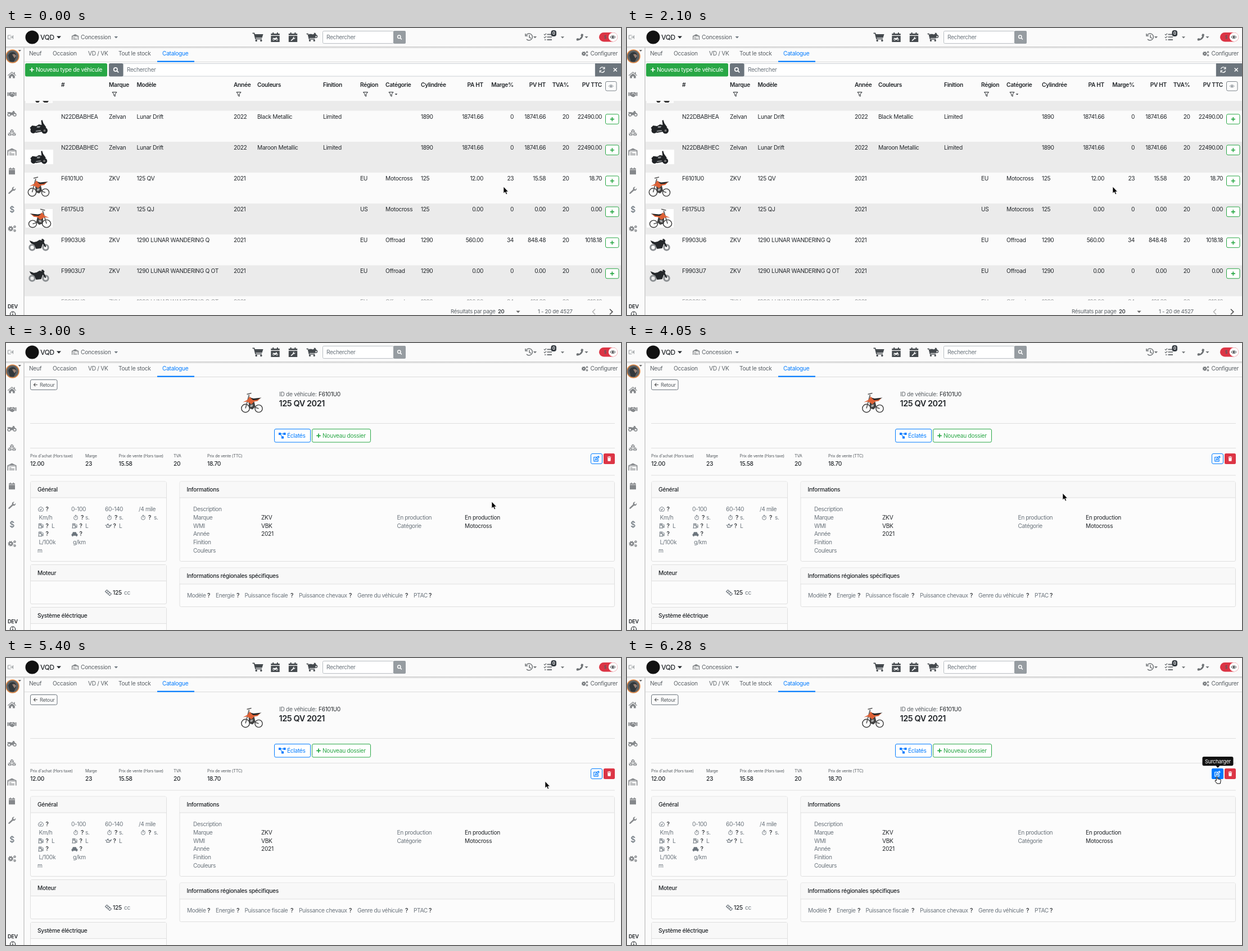
Animation of 1094 by 512 pixels, one loop 8000 ms. Source, as an HTML page:

```html
<!DOCTYPE html>
<html lang="fr">
<head>
<meta charset="utf-8">
<title>Catalogue</title>
<style>
html, body { margin: 0; width: 100%; height: 100%; overflow: hidden; background: #fbfbfb; }
svg { display: block; width: 100vw; height: 100vh; }
text { font: 10.2px Inter, Roboto, "Liberation Sans", sans-serif; letter-spacing: -.03em; fill: #212529; white-space: pre; }
.num { letter-spacing: -.045em; }
.b { font-weight: 600; }
.m { font-weight: 500; }
.brand { font-size: 12px; font-weight: 500; }
.title { font-size: 14.5px; font-weight: 600; }
.small { font-size: 9.1px; }
.foot { font-size: 9.6px; }
.tiny { font-size: 7.25px; fill: #555b60; }
.tip { font-size: 9.3px; }
.g { fill: #6c757d; letter-spacing: -.04em; }
.n { fill: #595f64; }
.w { fill: #fff; }
.blue { fill: #007bff; }
.green { fill: #28a745; }
.e { text-anchor: end; }
.c { text-anchor: middle; }
.l { fill: none; stroke: currentColor; }
use { fill: currentColor; }
#list, #load, #page, #arrow, #hand, #over { animation: 8s step-end infinite; }
#list { animation-name: list; }
#load { animation-name: load; }
#page { animation-name: page; }
#arrow { animation-name: arrow; }
#hand { animation-name: hand; }
#over { animation-name: over; }
@keyframes list { 0% { opacity: 1 } 35.625%, 100% { opacity: 0 } }
@keyframes load { 0% { opacity: 0 } 35.625% { opacity: 1 } 37.5%, 100% { opacity: 0 } }
@keyframes page { 0% { opacity: 0 } 37.5%, 100% { opacity: 1 } }
@keyframes hand { 0% { opacity: 0 } 76.75%, 100% { opacity: 1 } }
@keyframes over { 0% { opacity: 0 } 76.75% { opacity: .5 } 78.5%, 100% { opacity: 1 } }
@keyframes arrow {
  0% { transform: translate(885px, 283px) }
  7.5% { transform: translate(885px, 284px) }
  24.375% { transform: translate(877px, 283px) }
  26.25% { transform: translate(864px, 283px) }
  48.75% { transform: translate(811px, 282px) }
  50.625% { transform: translate(775px, 268px) }
  61.875% { transform: translate(878px, 244px) }
  63.75% { transform: translate(924px, 242px) }
  67.5% { transform: translate(959px, 220px) }
  69.375% { transform: translate(994px, 218px) }
  71.25% { transform: translate(999px, 216px) }
  73.125% { transform: translate(1030px, 210px) }
  74.875% { transform: translate(1038px, 210px) }
  76.75%, 100% { transform: translate(-40px, 0) }
}
</style>
</head>
<body>
<svg id="stage" viewBox="0 0 1094 512" preserveAspectRatio="none" xmlns="http://www.w3.org/2000/svg">
<defs>
  <linearGradient id="shade" x2="0" y2="1"><stop stop-color="#c9c9c9"/><stop offset="1" stop-color="#fbfbfb"/></linearGradient>
  <clipPath id="table"><path d="M33 130H1094V485.5H33Z"/></clipPath>
  <path id="caret" d="M-3.6-1.8H3.6L0 2Z"/>
  <path id="plus" d="M-4-.9H-.9V-4H.9V-.9H4V.9H.9V4H-.9V.9H-4Z"/>
  <path id="funnel" class="l" d="M-4-3.6H4L1.1 0V4L-1.1 2.6V0Z"/>
  <g id="find" class="l" stroke-width="1.6"><circle cx="-.8" cy="-.8" r="3"/><path d="M1.5 1.5 4.3 4.3"/></g>
  <g id="eye"><path class="l" d="M-5 0Q0-5.5 5 0Q0 5.5-5 0Z"/><circle r="1.6"/></g>
  <g id="gear"><circle class="l" r="2.6" stroke-width="2.6"/><circle class="l" r="4.2" stroke-width="1.5" stroke-dasharray="1.6 1.7"/></g>
  <g id="cogs"><use href="#gear" x="-2.2"/><use href="#gear" transform="translate(5 -3.5) scale(.5)"/><use href="#gear" transform="translate(5 3.5) scale(.5)"/></g>
  <path id="house" d="M-7.6 .3 0-6 3.6-3V-5.2H5.2V-1.6L7.6 .3 6.8 1.2 0-4.4-6.8 1.2ZM-5.2 1.3 0-3 5.2 1.3V5.6H1.5V2.2H-1.5V5.6H-5.2Z"/>
  <g id="shake"><path d="M-8-3.5H-6V3H-8ZM6-3.5H8V3H6ZM-5.3-2.8-2-4 0-3.2 2.5-4 5.3-2.8V2.2L1.5 5-1 4.6-5.3 2Z"/><path d="M-2.2-.3 1-2.2 4.3 1.2" fill="none" stroke="#fbfbfb"/></g>
  <g id="moto"><circle class="l" cx="-5" cy="2.2" r="2.4" stroke-width="1.5"/><circle class="l" cx="5" cy="2.2" r="2.4" stroke-width="1.5"/><path d="M-8-2.5H-3L-1-1.5 2-3 1-4.5H4L6.5 1 5.5 1.5 3.5-1 1.5 3H-2.5L-4-.5-8-1Z"/></g>
  <g id="boxes"><path id="cube" d="M0-6 3.2-4.6V-1.2L0 .2-3.2-1.2V-4.6Z"/><use href="#cube" x="-3.7" y="5.6"/><use href="#cube" x="3.7" y="5.6"/><path d="M-3-4.4 0-3 3-4.4M0-3V0M-6.7 1.2-3.7 2.6-.7 1.2M-3.7 2.6V5.5M.7 1.2 3.7 2.6 6.7 1.2M3.7 2.6V5.5" fill="none" stroke="#fbfbfb"/></g>
  <path id="depot" fill-rule="evenodd" d="M-8 6.5V-2.8L0-6.5 8-2.8V6.5H6.5V-1H-6.5V6.5ZM-6.2-2.8V-2H6.2V-2.8ZM-4.8 1H-.8V2H-4.8ZM-4.8 3H4.5V4H-4.8ZM-4.8 5H4.5V6H-4.8Z"/>
  <path id="cal" d="M-5.5-4.8H-3.5V-6.3H-2V-4.8H2V-6.3H3.5V-4.8H5.5V-2.8H-5.5ZM-5.5-2H5.5V6H-5.5Z"/>
  <path id="wrench" d="M-6 4.4.4-1.8C-.4-4.6 1.7-6.5 4.5-6L2.3-3.7 3-2 4.6-1.5 6.6-3.7C7.4-.8 4.8 1.5 2 .6L-4.3 6.2C-5.9 6.8-7 5.5-6 4.4Z"/>
  <g id="cart"><path class="l" d="M-9.5-7.2H-6.5L-4 3H7" stroke-width="1.7"/><path d="M-6-5.5H9.5L7.5 1H-4.3Z"/><circle cx="-2.8" cy="6" r="1.8"/><circle cx="5.8" cy="6" r="1.8"/></g>
  <path id="phone" d="M3.2-6 6.3-5.2C6.5 1.5 1.5 6.5-5.4 6.2L-6 3-3 1.6-1.2 3C.7 2 2-.1 2.8-1.6L1.6-3Z"/>
  <g id="edit" class="l" stroke-width="1.2"><path d="M1.2-3.2H-4.2V4.2H3.2V.4"/><path d="M-1.5 1.8-1-.6 3.6-4.8 5-3.2.6 1.2Z"/></g>
  <path id="trash" d="M-3.7-4.2H-1.5L-1-5H1L1.5-4.2H3.7V-3H-3.7ZM-3.2-2.4H3.2L2.7 4.5H-2.7Z"/>
  <g id="watch" class="l"><circle cy=".8" r="3.8"/><path d="M-1.4-4.4H1.4M0-4.4V-3M0-1.3V1M3-3.2 4-2.3"/></g>
  <g id="gauge" class="l"><path d="M-3.8 3.7A5 5 0 1 1 3.8 3.7Z"/><path d="M-1.4 2 1.8-1.2M-3-.3H-2" stroke-width="1.3"/></g>
  <g id="pump"><path class="l" d="M-4 4.4V-4.3H1V4.4M-5.2 4.4H2.2M1 0H2.7V3.4H4.6V-1.5L2.8-3.6" stroke-width="1.1"/><path d="M-2.7-3H-.2V-.4H-2.7Z"/></g>
  <path id="oil" class="l" stroke-width="1.2" d="M-6-1.5-3.5 0V2.8H2.2L6-1.8 2-.3-.5-1.8H-3.5M-2.5-3.4H1M-.8-3.4V-2"/>
  <path id="car" d="M-6 .3-4.5-.6-3.4-4H2.8L4.2-.6 6 .3V3.4H5V4.8H2.8V3.4H-2.8V4.8H-5V3.4H-6Z"/>
  <g id="cruiser"><circle cx="-10" cy="7" r="5"/><circle cx="10" cy="7" r="5.5"/><path d="M-16 2-12-2-5-1 0-4 5-3 4-11 6-12 8-6 13 1 9 5 5 9-5 11-13 7Z"/><path d="M-3-1 3-1 1 2-4 2ZM-5 7 4 6 3 8-6 9Z" fill="#8d9194"/><circle cx="10" cy="7" r="2" fill="#777"/></g>
  <g id="dirt">
    <g fill="none" stroke="#3b3b3b" stroke-width="1.4"><circle cx="-11.5" cy="10" r="7.2"/><circle cx="12" cy="10.5" r="6.6"/></g>
    <path d="M-6-1 4-2 6 7 1 12-5 10Z" fill="#3f3f3f"/>
    <path d="M-5-14-11.5 10M-9-15-1-17M5 8 12 10.5" fill="none" stroke="#555" stroke-width="1.6"/>
    <path d="M-16-1-8-5-4-11 0-7 4-6 15-8 10-3 4-2-1 3-5 0-9-2Z" fill="#dd6136"/>
    <path d="M-3-9 3-7.5 17-9 9-5 2-4.5Z" fill="#262626"/>
    <path d="M-3 4 2 3 1 7-3 8Z" fill="#aaa"/>
  </g>
  <g id="stock"><g fill="none" stroke="#8b8f92" stroke-width="3"><circle cx="-12" cy="4.5" r="4.7"/><circle cx="12" cy="4.5" r="4.7"/></g><path d="M-17-8-9-5-4-6 1-9 6-8 4-10 7-11 10-8 9-5 13 3 11 4 7-2 4 6-5 7-8 0-14-3Z" fill="#25282b"/></g>
</defs>
</svg>
<script>
const out = [];
const add = s => out.push(s);
const t = (x, y, s, cls = '') => add(`<text x="${x}" y="${y}" class="${cls}">${s}</text>`);
const icon = (id, x, y, color = '#6f7376', s = 1) =>
  add(`<use href="#${id}" transform="translate(${x} ${y}) scale(${s})" style="color:${color}"/>`);
const box = (x, y, w, h, fill, stroke = 'none', r = 0) =>
  add(`<rect x="${x}" y="${y}" width="${w}" height="${h}" rx="${r}" fill="${fill}" stroke="${stroke}"/>`);
const path = (d, stroke, w = 1, fill = 'none') =>
  add(`<path d="${d}" fill="${fill}" stroke="${stroke}" stroke-width="${w}"/>`);
const dot = (x, y, r, fill, stroke = 'none', w = 1) =>
  add(`<circle cx="${x}" cy="${y}" r="${r}" fill="${fill}" stroke="${stroke}" stroke-width="${w}"/>`);
const group = (attrs, draw) => { add(`<g ${attrs}>`); draw(); add('</g>'); };

const DARK = '#454a4e', BLUE = '#007bff', GREEN = '#28a745', RED = '#dc3545', LINE = '#dfdfdf';

function topBar() {
  box(0, 0, 1094, 33, '#fafafa');
  box(0, 33, 1094, 4, 'url(#shade)');
  path('M8.5 13H3.5V19.5H8.5M7 16.2H11M9.5 14 12 16.2 9.5 18.5M12.5 13V19.5', '#8b8f92', .9);
  dot(46.5, 16.5, 12, '#111');
  t(61, 20.7, 'VQD', 'brand');
  icon('caret', 94, 16.5, '#212529', 1.1);
  icon('depot', 123, 16.2, '#6f7376', .75);
  t(133, 20, 'Concession', 'n');
  icon('caret', 195.8, 16.7, '#6c757d', .9);
  icon('cart', 448, 16.5, DARK);
  for (const x of [479, 510.5]) icon('cal', x, 16.7, DARK, 1.4);
  icon('moto', 479, 19.2, '#fff', .6);
  icon('wrench', 510.5, 19.2, '#fff', .6);
  icon('cart', 543, 17, DARK, .9);
  icon('moto', 546.5, 13, DARK, .95);
  box(563.5, 5.5, 126, 22, '#fff', '#b9bec3', 2);
  t(570, 20, 'Rechercher', 'g');
  box(689, 5, 22, 23, '#969ca1', 'none', 2);
  icon('find', 700, 16.5, '#fff', .9);
  path('M925.5 12.5A6 6 0 1 1 926 20M924 10V14H928M931 12.5V16.7L934 18.3', '#6f7376', 1.5);
  icon('caret', 941, 16.5, '#6f7376', .85);
  path('M962.5 11.5H971M962.5 16.2H971M962.5 21H971', '#6f7376', 1.8);
  path('M957 11 958.4 12.6 961 9.8M957 16 958.4 17.6 961 14.8M958 21H960.5', '#6f7376', 1.3);
  box(969.5, 4, 9.5, 11, '#343a40', 'none', 4);
  t(974.2, 12.2, '0', 'tiny b w c');
  icon('caret', 990, 16.7, '#6f7376', .85);
  icon('phone', 1020.5, 16.3);
  icon('caret', 1032.5, 16.5, '#6f7376', .85);
  box(1055, 8, 33, 16.5, RED, 'none', 8.2);
  t(1066, 19, '$', 'tiny b c');
  dot(1079.8, 16.2, 8, '#fff');
  icon('eye', 1079.5, 16.2, '#212529', .9);
}

function sideBar() {
  path('M32 35V512', '#c4c4c4', 1.4);
  dot(11.5, 50.5, 11.5, '#5e6264', '#e58a45', 1.5);
  path('M4 49Q7 42 13 43T18 52L14 60H7Z', 'none', 0, '#33383b');
  path('M11 47Q16 45 18 50L15 54Z', 'none', 0, '#9a8174');
  icon('caret', 24.3, 40.5, '#555', .75);
  ['house', 'shake', 'moto', 'boxes', 'depot', 'cal', 'wrench', '', 'cogs']
    .forEach((id, i) => id && icon(id, 10.5, 84 + i * 34.25, '#85888b'));
  add('<text x="10.5" y="328.5" class="m c g" style="font-size:14px">$</text>');
  t(12, 500, 'DEV', 'small b c');
  dot(12, 510.5, 4.5, 'none', '#212529', 1.1);
  path('M12 507V508.3M12 509.5V513', '#212529', 1.3);
}

function tabs() {
  path('M33 60.5H1094', '#dcdcdc');
  [[41, 'Neuf'], [83, 'Occasion'], [146, 'VD / VK'], [200, 'Tout le stock']].forEach(([x, s]) => t(x, 49.3, s, 'n'));
  t(278, 49.3, 'Catalogue', 'blue');
  box(269, 58.6, 66, 2.2, BLUE);
  icon('cogs', 1029.5, 45.8, '#6f7376', .8);
  t(1088, 49.3, 'Configurer', 'n e');
}

// Column positions; a trailing "e" flag means right aligned.
const cols = [[98], [183], [232.5], [405], [447], [564], [630], [675], [738],
  [849, 'e'], [903, 'e'], [960, 'e'], [1001.5, 'e'], [1060, 'e']];
const heads = '#,Marque,Modèle,Année,Couleurs,Finition,Région,Catégorie,Cylindrée,PA HT,Marge%,PV HT,TVA%,PV TTC'.split(',');
const rows = [
  'N22DBABHEA,Zelvan,Lunar Drift,2022,Black Metallic,Limited,,,1890,18741.66,0,18741.66,20,22490.00',
  'N22DBABHEC,Zelvan,Lunar Drift,2022,Maroon Metallic,Limited,,,1890,18741.66,0,18741.66,20,22490.00',
  'F6101U0,ZKV,125 QV,2021,,,EU,Motocross,125,12.00,23,15.58,20,18.70',
  'F6175U3,ZKV,125 QJ,2021,,,US,Motocross,125,0.00,0,0.00,20,0.00',
  'F9903U6,ZKV,1290 LUNAR WANDERING Q,2021,,,EU,Offroad,1290,560.00,34,848.48,20,1018.18',
  'F9903U7,ZKV,1290 LUNAR WANDERING Q OT,2021,,,EU,Offroad,1290,0.00,0,0.00,20,0.00',
  'F9903U8,ZKV,1290 LUNAR WANDERING Q OT,2021,,,EU,Offroad,1290,120.00,34,181.82,20,218.18'
].map(r => r.split(','));

function cells(values, y, cls) {
  values.forEach((s, i) => {
    const [x, end = ''] = cols[i];
    if (s) t(x, y, s, `${cls} ${end} ${/^[\d.]+$/.test(s) ? 'num' : ''}`);
  });
}

function tableBody() {
  box(33, 130, 1061, 17.5, '#ebebeb');
  box(35, 130, 48, 4, '#fbfbfb');
  path('M52 130H60L58 133H54ZM65 130H76L74 133H68Z', 'none', 0, '#333');
  rows.forEach((r, i) => {
    const top = 147.8 + i * 55.1, last = i == 6;
    if (i % 2) box(33, top, 1061, 55.1, '#ebebeb');
    group(last ? 'opacity=".45"' : '', () => cells(r, top + 13.7, ''));
    if (last) return;
    box(1066.5, top + 6, 23.5, 17.5, '#fff', GREEN, 2.5);
    icon('plus', 1078.3, top + 14.8, GREEN, .9);
  });
  box(34, 217, 50, 26, '#fff');
  box(35, 323, 48, 33, '#fff');
  icon('cruiser', 58.5, 176, '#202326');
  icon('cruiser', 58.5, 230.5, '#202326', .95);
  icon('dirt', 58, 283);
  icon('dirt', 60, 339.5, '', '-1.05 .95');
  icon('stock', 58.5, 387);
  icon('stock', 58.5, 442);
}

function list() {
  box(34, 63, 146, 23.5, GREEN, 'none', 2.5);
  icon('plus', 46, 74.5, '#fff', .95);
  t(53, 78.3, 'Nouveau type de véhicule', 'w');
  box(208, 63.5, 840, 22.5, '#fff', '#ccd1d6');
  box(183, 63, 25.5, 23.5, '#6c757d', 'none', 2.5);
  icon('find', 195.7, 74.8, '#fff', 1.05);
  t(215, 78.3, 'Rechercher', 'g');
  box(1048, 63, 47, 23.5, '#6c757d');
  path('M1056.5 73A4.3 4.3 0 0 1 1064 71.5M1064.8 69.5V72.8H1061.5M1064.7 76A4.3 4.3 0 0 1 1057 77.5M1056.3 79.5V76.2H1059.5', '#fff', 1.3);
  path('M1080.7 71.5 1086.7 77.5M1086.7 71.5 1080.7 77.5', '#fff', 1.5);
  cells(heads, 105.3, 'b');
  for (const x of [193, 414, 639.5, 685]) icon('funnel', x, 118, '#212529');
  icon('caret', 694, 118.3, '#212529', .65);
  box(1066.5, 95.5, 19.5, 16.5, '#fbfbfb', '#7d848a', 2.5);
  icon('eye', 1076.2, 103.7, '#6c757d', .8);
  group('clip-path="url(#table)"', tableBody);
  t(791, 509.3, 'Résultats par page', 'foot n');
  t(875, 509.3, '20', 'foot m');
  icon('caret', 911, 506.3, '#666');
  t(946, 509.3, '1 - 20 de 4527', 'foot n');
  path('M1048 501.5 1043.5 506.3 1048 511', '#b5b5b5', 1.6);
  path('M1074 501.5 1078.8 506.3 1074 511', '#555', 1.7);
}

function loading() {
  dot(531, 67.3, 4.5, 'none', '#a4a9ad', 1.2);
  path('M531 62.8A4.5 4.5 0 0 1 535.5 67.3', BLUE, 1.3);
  t(538, 71.5, 'Chargement...');
}

function card(x, y, w, h, title) {
  box(x + .5, y + .5, w, h, '#fcfcfc', LINE, 2.5);
  box(x + 1, y + 1, w - 1, 28, '#f8f8f8');
  path(`M${x} ${y + 29.5}H${x + w}`, LINE);
  t(x + 13, y + 18.8, title, 'm');
}

function general() {
  const pair = (id, x, y, unit) => {
    icon(id, x + 6, y - 3.5, '#6c757d', .9);
    t(x + 14.5, y, '?', 'm');
    if (unit) t(x + 25, y, unit, 'g');
  };
  pair('gauge', 56, 300.2);
  [[116, '0-100'], [176, '60-140'], [236, '/4 mile']].forEach(([x, s], i) => {
    t(x, 300.2, s, 'g');
    icon('watch', x + 8, 311.2, '#6c757d', .9);
    t(x + 17, 315, '?', 'm');
    t(x + (i == 2 ? 27 : 25), 315, 's.', 'g');
  });
  t(58.5, 315, 'Km/h', 'g');
  pair('pump', 56, 329.6, 'L');
  pair('pump', 116, 329.6, 'L');
  pair('oil', 176, 329.6, 'L');
  pair('pump', 56, 344.3);
  pair('car', 116, 344.3);
  t(58.5, 359, 'L/100k', 'g');
  t(119, 359, 'g/km', 'g');
  t(56, 373.6, 'm', 'g');
}

function detail() {
  box(43.5, 65.5, 47.5, 18, '#fbfbfb', '#6c757d', 2.5);
  path('M56 74.5H49.5M52.3 71.7 49.5 74.5 52.3 77.3', '#555', 1.2);
  t(60, 77.8, 'Retour', 'small n');
  icon('dirt', 437.5, 106.5);
  t(486, 94.5, 'ID de véhicule:', 'n');
  t(556, 94.5, 'F6101U0');
  t(485.5, 113, '125 QV 2021', 'title');
  for (const y of [143.5, 187.5, 236]) path(`M43 ${y}H1083`, LINE);

  box(477.5, 153.5, 64, 23.5, '#fff', BLUE, 2.5);
  path('M487 162H495M488 163 492 168', BLUE, 1.1);
  path('M485 160H489V164H485ZM493.5 160H497.5V164H493.5ZM490 166.5H494V170.5H490Z', 'none', 0, BLUE);
  t(500, 169, 'Éclatés', 'blue');
  box(544.5, 153.5, 104, 23.5, '#fff', GREEN, 2.5);
  icon('plus', 556, 165.3, GREEN, .95);
  t(563, 169, 'Nouveau dossier', 'green');

  [[43, "Prix d'achat (Hors taxe)", '12.00'], [141, 'Marge', '23'], [200.5, 'Prix de vente (Hors taxe)', '15.58'],
    [298, 'TVA', '20'], [358, 'Prix de vente (TTC)', '18.70']].forEach(([x, name, value]) => {
    t(x, 203.7, name, 'tiny');
    t(x, 219, value, 'm');
  });
  box(1040.5, 197.5, 20, 18, '#fff', BLUE, 2.5);
  icon('edit', 1050, 206.7, BLUE);
  box(1063, 197, 20, 19, RED, 'none', 2.5);
  icon('trash', 1073, 206.8, '#fff', .9);

  card(43, 246.5, 242, 142.5, 'Général');
  general();
  card(43, 395, 242, 70, 'Moteur');
  path('M176.5 443.5 179.5 440.5 187.5 447.5 184.5 450.5ZM179 445.5 182 442.7M181.5 447.7 184.5 445', '#6c757d', 1.1);
  t(190, 449.3, '125', 'm');
  t(210, 449.3, 'cc', 'g');
  card(43, 471, 242, 80, 'Système éléctrique');

  card(308.5, 246.5, 773.5, 142.5, 'Informations');
  [['Description', ''], ['Marque', 'ZKV'], ['WMI', 'VBK'], ['Année', '2021'], ['Finition', ''], ['Couleurs', '']]
    .forEach(([name, value], i) => {
      t(333, 300.2 + i * 14.68, name, 'g');
      t(454, 300.2 + i * 14.68, value);
    });
  [['En production', 'En production'], ['Catégorie', 'Motocross']].forEach(([name, value], i) => {
    t(695.5, 315 + i * 14.6, name, 'g');
    t(816, 315 + i * 14.6, value);
  });

  card(308.5, 400.5, 773.5, 69.5, 'Informations régionales spécifiques');
  [[322, 'Modèle', 358], [373, 'Energie', 410], [424.5, 'Puissance fiscale', 506], [521, 'Puissance chevaux', 610],
    [625, 'Genre du véhicule', 710], [725, 'PTAC', 752]].forEach(([x, s, q]) => {
    t(x, 454, s, 'g');
    t(q, 454, '?', 'm');
  });
}

function hover() {
  box(1040, 197, 21, 19, BLUE, 'none', 2.5);
  icon('edit', 1050, 206.7, '#fff');
  box(1023.5, 176, 55, 16.3, '#111', 'none', 2.8);
  path('M1047.5 192H1054.5L1051 196Z', 'none', 0, '#111');
  t(1051, 187.5, 'Surcharger', 'tip w c');
}

topBar();
sideBar();
tabs();
group('id="list"', list);
group('id="load"', loading);
group('id="page"', detail);
group('id="over"', hover);
group('id="arrow"', () => path('M0 0V12L2.8 9.5 4.7 13.8 6.7 13 4.9 9H8.5Z', '#fff', .7, '#000'));
group('id="hand"', () => path('M1048.3 218V212.2Q1049.3 210.6 1050.3 212.2V215.6L1055 216.4Q1056.5 216.8 1056.3 218.5L1055.3 224H1049.5L1046 219.3Q1046.3 217.2 1048.3 218.8Z', '#000', 1, '#fff'));
document.getElementById('stage').insertAdjacentHTML('beforeend', out.join(''));
</script>
</body>
</html>
```
